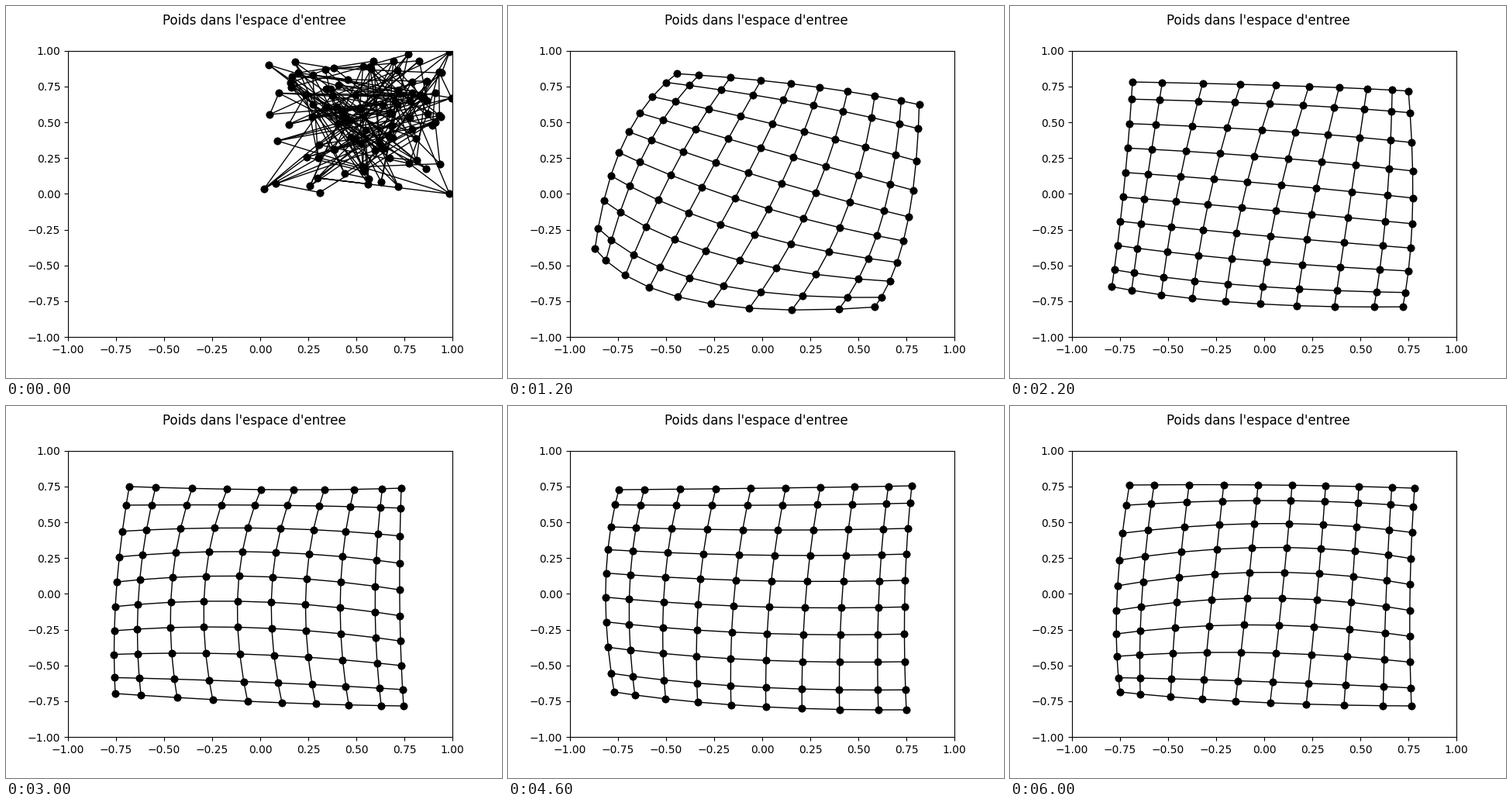
Animation, 640 px wide and 480 px high, one loop 6200 ms. Source, as a matplotlib script:

```python
import numpy as np
import matplotlib.pyplot as plt
from matplotlib.animation import FuncAnimation

N = 10                       # the map is N x N neurons
FRAMES, STEP = 31, 200
ORIGIN, SCALE = np.array([328, 242.4]), np.array([248, -184.8])

# Outermost weights of the random start.
RIM = [(.31, .01), (.08, .07), (.02, .035), (.985, 0), (.995, .67),
       (.985, .99), (.77, .975), (.045, .9), (.18, .92), (.05, .555),
       (.09, .37), (.935, .21)]

# Step -> corners, edge middles and centre of the map, in stage pixels.
KEYS = {
    3: [(299, 80), (429, 110), (539, 162),
        (146, 117), (322, 234), (506, 305),
        (108, 253), (190, 380), (426, 401)],
    8: [(157, 100), (368, 97), (519, 110),
        (148, 221), (322, 244), (518, 272),
        (120, 355), (277, 386), (497, 388)],
    15: [(159, 104), (350, 108), (510, 106),
         (142, 243), (321, 236), (508, 254),
         (141, 371), (334, 382), (513, 387)],
    20: [(156, 89), (350, 102), (516, 114),
         (140, 236), (330, 249), (508, 240),
         (143, 389), (320, 388), (509, 380)],
    23: [(143, 108), (336, 106), (521, 103),
         (126, 231), (315, 242), (512, 242),
         (137, 369), (310, 387), (514, 392)],
    30: [(154, 102), (342, 102), (522, 106),
         (138, 248), (330, 231), (516, 247),
         (142, 369), (313, 382), (518, 387)],
}
TIMES = list(KEYS)


def basis():
    """Quadratic blend along one side; cells are narrower at the border."""
    gaps = np.ones(N - 1)
    gaps[[0, -1]] = 0.7
    u = np.concatenate([[0], np.cumsum(gaps)]) / gaps.sum()
    return np.stack([(1 - u) * (1 - 2 * u), 4 * u * (1 - u),
                     u * (2 * u - 1)], axis=1)


B = basis()


def spread(points):
    """Stretch a 3 x 3 net of points over the whole map."""
    return np.einsum("ia,jb,abc->ijc", B, B, np.reshape(points, (3, 3, 2)))


def tangle():
    rng = np.random.default_rng(5)
    count = N * N - len(RIM)
    inner = np.column_stack([rng.beta(1.7, 1.2, count),
                             rng.beta(1.7, 1.3, count)])
    inner = [0.08, 0.03] + inner * [0.9, 0.92]
    rest = rng.permutation(np.vstack([RIM[2:], inner]))
    return np.vstack([RIM[:2], rest]).reshape(N, N, 2)


START = tangle()
POSES = [(spread(p) - ORIGIN) / SCALE for p in KEYS.values()]


def weights(i):
    if i == 0:
        return START
    if i <= TIMES[0]:
        return POSES[0] * (1 - 0.04 * (TIMES[0] - i))
    k = np.searchsorted(TIMES, i) - 1
    u = (i - TIMES[k]) / (TIMES[k + 1] - TIMES[k])
    jitter = np.random.default_rng(i).normal(0, 0.015, (3, 3, 2))
    return (POSES[k] * (1 - u) + POSES[k + 1] * u
            + spread(jitter) * np.sin(np.pi * u))


fig, ax = plt.subplots(figsize=(6.4, 4.8), dpi=100)
fig.suptitle("Poids dans l'espace d'entree")
ax.set(xlim=(-1, 1), ylim=(-1, 1))
lines = [ax.plot([], [], "ko-", lw=1, ms=6)[0] for _ in range(2 * N)]


def draw(i):
    net = weights(i)
    for line, chain in zip(lines, [*net, *net.swapaxes(0, 1)]):
        line.set_data(chain[:, 0], chain[:, 1])
    return lines


anim = FuncAnimation(fig, draw, frames=FRAMES, interval=STEP,
                     repeat=True, repeat_delay=0)
plt.show()
```
